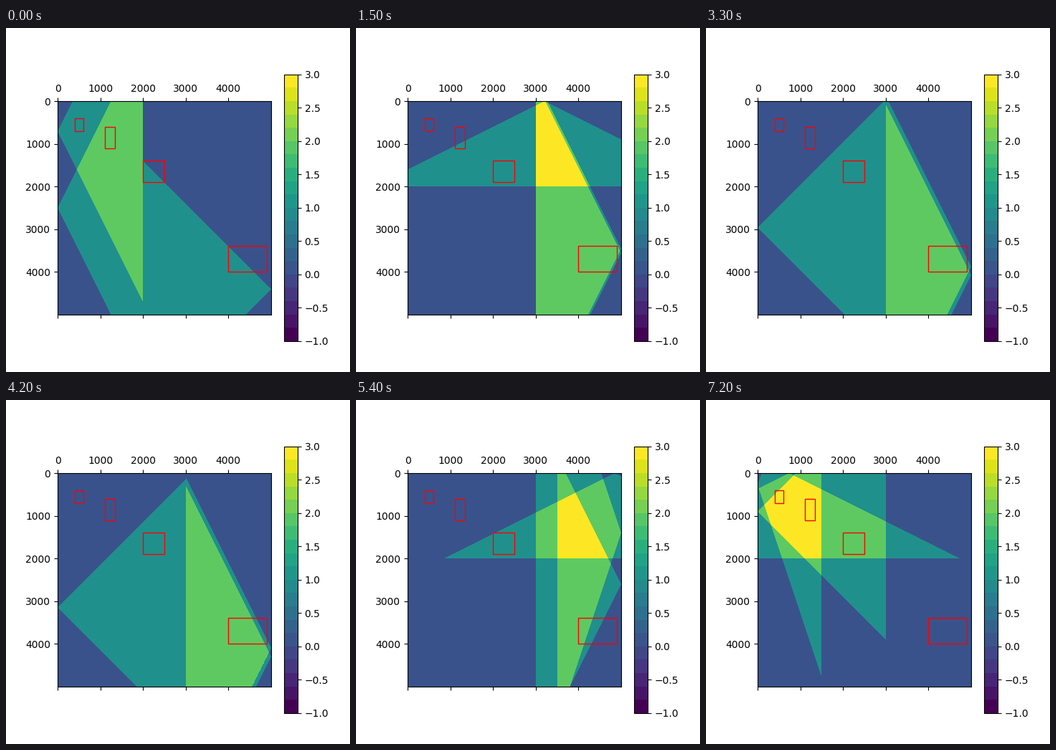
A matplotlib script for the animation above (7500 ms loop, 480x480 px).

```python
import numpy as np
import matplotlib.pyplot as plt
from matplotlib.animation import FuncAnimation
from matplotlib.cm import ScalarMappable
from matplotlib.colors import Normalize
from matplotlib.patches import Rectangle

SIZE = 5000      # side of the room
CELLS = 298      # samples per side
STEPS = 5        # steps in each search
STEP_MS = 300

# Sensor types: (spread per unit of depth, depth)
WIDE = (2, 2000)
LONG = (1, 3000)
FAN = (3, 1500)

# Each search moves its sensors along their walls: (wall, type, start, end)
SEARCHES = [
    [("left", WIDE, 2500, 2200), ("left", WIDE, 700, 900),
     ("right", LONG, 4400, 4300)],
    [("top", WIDE, 3210, 2940), ("right", WIDE, 3460, 3560),
     ("right", WIDE, 3560, 3560)],
    [("left", LONG, 2900, 3150), ("right", WIDE, 3800, 4100),
     ("right", WIDE, 4000, 4300)],
    [("top", WIDE, 4700, 4900), ("right", WIDE, 2660, 2580),
     ("right", FAN, 1250, 1450)],
    [("top", WIDE, 640, 740), ("left", LONG, 1100, 900),
     ("left", FAN, 80, 280)],
]

# Areas to watch: x, y, width, height
AREAS = [(400, 400, 200, 300), (1100, 600, 250, 500),
         (2000, 1400, 500, 500), (4000, 3400, 900, 600)]

axis = np.floor((np.arange(CELLS) + 0.5) * SIZE / CELLS)
X, Y = np.meshgrid(axis, axis)


def cone(wall, kind, spot):
    """Cells seen by one sensor mounted on a wall."""
    spread, reach = kind
    depth, along = {"left": (X, Y), "right": (SIZE - X, Y),
                    "top": (Y, X)}[wall]
    return (depth <= reach) & (np.abs(along - spot) <= spread * depth)


def coverage(frame):
    """How many sensors see each cell."""
    search, step = divmod(frame, STEPS)
    progress = step / (STEPS - 1)
    total = np.zeros_like(X)
    for wall, kind, start, end in SEARCHES[search]:
        spot = round(start + (end - start) * progress, -1)
        total += cone(wall, kind, spot)
    return total


fig = plt.figure(figsize=(4.8, 4.8), dpi=100)
ax = fig.add_axes([0.15, 0.09, 0.775, 0.775])
norm = Normalize(-1, 3)
edge = SIZE - 0.5
image = ax.matshow(coverage(0), cmap="viridis", norm=norm,
                   extent=(-0.5, edge, edge, -0.5))
for x, y, w, h in AREAS:
    ax.add_patch(Rectangle((x, y), w, h, fill=False, edgecolor="red",
                           linewidth=1))
bands = plt.get_cmap("viridis").resampled(20)
fig.colorbar(ScalarMappable(norm, bands), ax=ax)


def update(frame):
    image.set_data(coverage(frame))
    return [image]


anim = FuncAnimation(fig, update, frames=STEPS * len(SEARCHES),
                     interval=STEP_MS, init_func=lambda: update(0),
                     repeat=True, repeat_delay=0)
plt.show()
```
